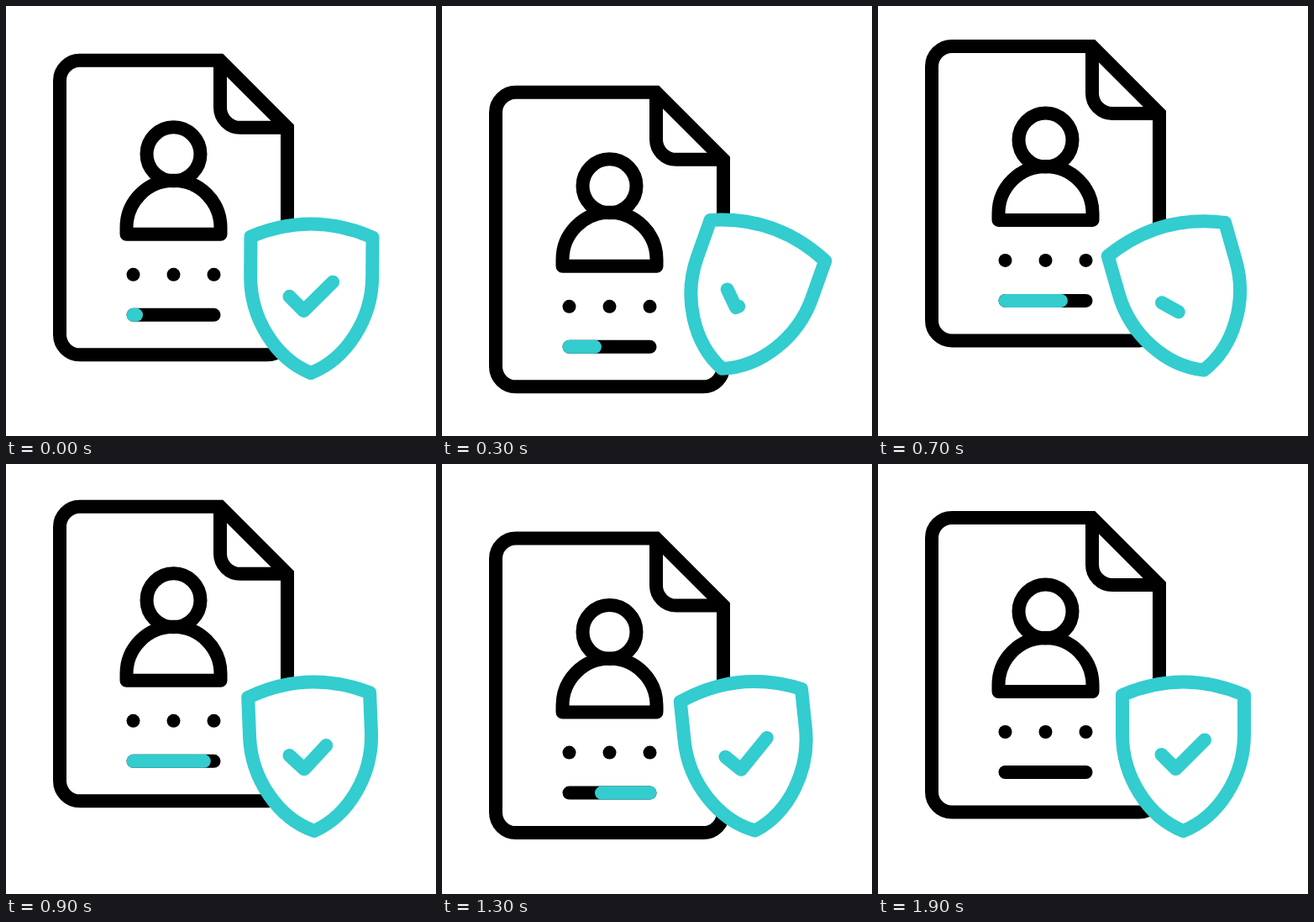
Animation, 512 px wide and 512 px high, one loop 2 s. Source, as an HTML page:

```html
<!DOCTYPE html>
<html lang="en">
<head>
<meta charset="utf-8">
<title>Verified profile document</title>
<style>
  html, body { margin: 0; width: 100%; height: 100%; overflow: hidden; background: #fff; }
  svg { display: block; width: 100vw; height: 100vh; }
  .ink { fill: none; stroke: #000; stroke-width: 16; }
  .teal { fill: none; stroke: #33cccf; stroke-width: 16; stroke-linecap: round; stroke-linejoin: round; }
  .round { stroke-linecap: round; stroke-linejoin: round; }
</style>
</head>
<body>
<svg viewBox="0 0 512 512">
  <g id="doc">
    <path class="ink" d="M255 64H88a24 24 0 0 0-24 24V390.500a24 24 0 0 0 24 24H311a24 24 0 0 0 24-24V144Z"/>
    <path class="ink" d="M255 64V120a24 24 0 0 0 24 24H335"/>
    <circle class="ink" cx="199.500" cy="175.500" r="32"/>
    <path class="ink round" d="M143.500 271V263a56 56 0 0 1 112 0V271Z"/>
    <circle cx="151.500" cy="319" r="8"/>
    <circle cx="199.500" cy="319" r="8"/>
    <circle cx="247.500" cy="319" r="8"/>
    <path class="ink round" d="M151.500 367H247.500"/>
    <path class="teal" id="bar"/>
  </g>
  <g id="shield">
    <path class="teal" style="fill:#fff" d="M291 275Q363.500 244 436 275V322C436 372 406 420 363.500 437C321 420 291 372 291 322Z"/>
    <path class="teal" id="check"/>
  </g>
</svg>
<script>
const LOOP = 2000, STEP = 100;
const [doc, bar, shield, check] = ['doc', 'bar', 'shield', 'check'].map(id => document.getElementById(id));

// Keys are [time in ms, value]
const docY = [[-40, 0], [420, 46.2], [450, 46.2], [775, -25], [1190, 32], [1534, 0]];
const tilt = [[-40, 0], [500, 28], [710, -16.2], [1060, 8.4], [1300, -6], [1540, 0]];
const drawn = [[40, 1], [490, 0], [500, 0], [1030, 1]];
const barEnd = [[-40, 151.5], [1030, 247.5]];
const barStart = [[979, 151.5], [1779, 247.5]];

const linear = p => p;
const sine = p => (1 - Math.cos(Math.PI * p)) / 2;

function at(keys, t, ease = sine) {
  if (t <= keys[0][0]) return keys[0][1];
  for (let i = 1; i < keys.length; i++) {
    const [t0, a] = keys[i - 1], [t1, b] = keys[i];
    if (t < t1) return a + (b - a) * ease((t - t0) / (t1 - t0));
  }
  return keys[keys.length - 1][1];
}

// Path along the first part of a polyline
function partial(points, share) {
  const lengths = points.slice(1).map((p, i) => Math.hypot(p[0] - points[i][0], p[1] - points[i][1]));
  let left = share * lengths.reduce((a, b) => a + b);
  if (left < 0.01) return '';
  let d = 'M' + points[0];
  for (let i = 0; i < lengths.length && left > 0; i++) {
    const k = Math.min(1, left / lengths[i]);
    const [a, b] = [points[i], points[i + 1]];
    d += 'L' + [a[0] + (b[0] - a[0]) * k, a[1] + (b[1] - a[1]) * k];
    left -= lengths[i];
  }
  return d;
}

const tick = [[337.5, 346], [354.5, 363], [389, 328.5]];

function draw(t) {
  doc.setAttribute('transform', `translate(0 ${at(docY, t)})`);
  shield.setAttribute('transform', `rotate(${at(tilt, t)} 363.500 348)`);
  check.setAttribute('d', partial(tick, at(drawn, t)));
  const from = at(barStart, t, linear), to = at(barEnd, t, linear);
  bar.setAttribute('d', to - from > 0.01 ? `M${from} 367H${to}` : '');
}

const begin = performance.now();
function tickFrame(now) {
  const t = Math.max(0, now - begin) % LOOP;
  draw(Math.floor(t / STEP) * STEP);
  requestAnimationFrame(tickFrame);
}
draw(0);
requestAnimationFrame(tickFrame);
</script>
</body>
</html>
```
